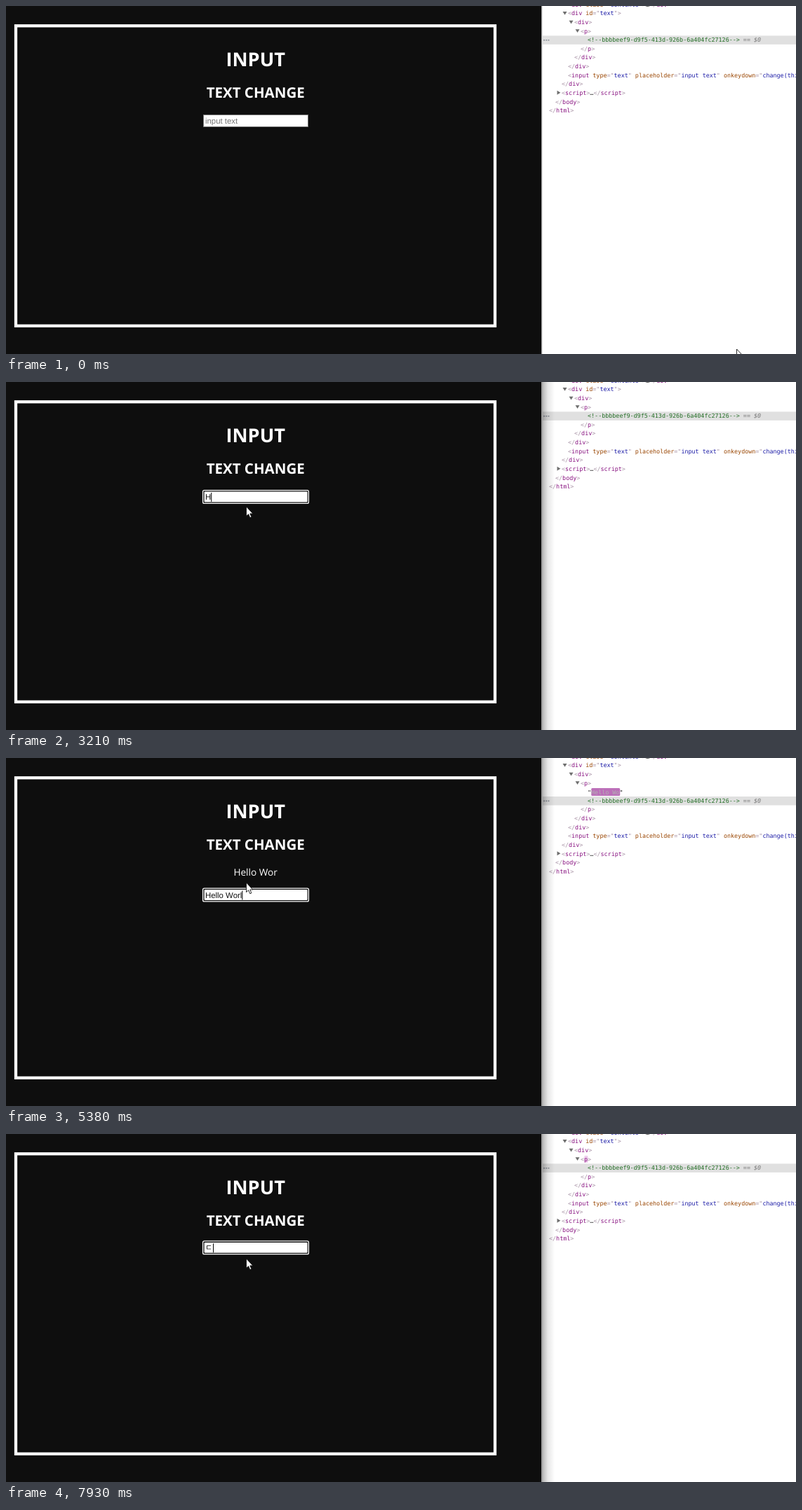
These frames come from a looping animation (1126 by 497 pixels, 8 s). An HTML page:

```html
<!DOCTYPE html>
<html lang="en">
<head>
<meta charset="utf-8">
<title>Input text change</title>
<style>
  html, body { margin: 0; width: 100%; height: 100%; overflow: hidden; background: #0e0e0e; }
  svg { display: block; width: 100%; height: 100%; }
  text { white-space: pre; text-rendering: geometricPrecision; }
  .page { font-family: "Open Sans", "Noto Sans", sans-serif; fill: #fff; text-anchor: middle; }
  .field { font: 11.4px "Liberation Sans", Arial, sans-serif; }
  .code { font: 8.39px "DejaVu Sans Mono", monospace; fill: #a894a6; }
  .tag { fill: #881280; }
  .attr { fill: #994500; }
  .val { fill: #1a1aa6; }
  .dark { fill: #222; }
</style>
</head>
<body>
<svg viewBox="0 0 1126 497" preserveAspectRatio="none">
  <defs>
    <linearGradient id="shade">
      <stop offset="0" stop-color="#000" stop-opacity=".3"/>
      <stop offset=".45" stop-color="#000" stop-opacity=".1"/>
      <stop offset="1" stop-color="#000" stop-opacity="0"/>
    </linearGradient>
  </defs>
  <rect width="1126" height="497" fill="#0e0e0e"/>
  <rect x="14" y="28.3" width="683" height="428.5" fill="none" stroke="#fff" stroke-width="4.3"/>
  <g class="page">
    <text x="355.7" y="86" font-size="27.2" font-weight="700">INPUT</text>
    <text x="355.7" y="131.3" font-size="20.5" font-weight="700">TEXT CHANGE</text>
    <text id="para" x="355.6" y="168" font-size="13.6"></text>
  </g>
  <g id="field">
    <rect id="plain" x="281.5" y="155.5" width="149" height="17" fill="#fff" stroke="#767676"/>
    <g id="focus">
      <rect x="280.6" y="154.6" width="150.8" height="18.8" rx="2" fill="#0e0e0e" stroke="#fff" stroke-width="1.3"/>
      <rect x="282.6" y="156.6" width="147" height="14.8" rx="1" fill="#fff"/>
    </g>
    <text id="hint" class="field" x="284" y="168" fill="#757575">input text</text>
    <text id="value" class="field" x="284" y="168" fill="#111"></text>
    <text id="jamo" x="284" y="168" fill="#111" font-size="11" font-family="'Noto Sans CJK KR', 'Noto Sans CJK', sans-serif">ㄷ</text>
    <rect id="caret" y="158" width="1" height="13" fill="#000"/>
  </g>

  <rect x="763.5" width="362.5" height="497" fill="#fff"/>
  <rect x="763.5" width="1" height="497" fill="#c8c8c8"/>
  <rect id="tagFlash" x="824.4" y="31" width="5" height="10" rx="1"/>
  <g id="upper" class="code"></g>
  <g id="added" class="code">
    <rect id="rowFlash" x="819" y="42.3" width="307" height="12.7"/>
    <rect id="textFlash" x="834.2" y="43" width="0" height="11" rx="1.5"/>
    <text id="node" x="829" y="51.7"><tspan class="dark">"</tspan><tspan id="nodeText"></tspan><tspan class="dark">"</tspan></text>
  </g>
  <g id="lower" class="code">
    <rect x="764" y="42.4" width="362" height="12.5" fill="#e0e0e0"/>
    <path d="M766 48.7h2m1.2 0h2m1.2 0h2" stroke="#8a8f98" stroke-width="1.6"/>
  </g>
  <rect id="shadow" x="764" width="18" height="497" fill="url(#shade)"/>

  <circle id="press" cx="364.5" cy="165" r="10.3" fill="#fbee4a" opacity=".78"/>
  <path id="beam" d="M-3 -6.5H-1Q0 -6.5 0 -5.5Q0 -6.5 1 -6.5H3M0 -5.5V5.5M-3 6.5H-1Q0 6.5 0 5.5Q0 6.5 1 6.5H3" fill="none" stroke="#222" stroke-width="1"/>
  <path id="arrow" d="M0 0V13.6L3.1 10.8L5.3 15.8L7.4 14.8L5.3 10H9.4Z" fill="#fff" stroke="#111" stroke-width=".9"/>
</svg>
<script>
const LOOP = 8000, PITCH = 12.63, LAG = 67, CHAR = 5.05;
const $ = id => document.getElementById(id);
const show = (id, on) => $(id).setAttribute('visibility', on ? 'visible' : 'hidden');
const put = (id, attrs) => { for (const k in attrs) $(id).setAttribute(k, attrs[k]); };
const move = (id, x, y) => put(id, { transform: `translate(${x} ${y})` });
const setText = (id, s) => { if ($(id).textContent !== s) $(id).textContent = s; };

// Element tree
const esc = s => s.replace(/</g, '&lt;');
const span = (cls, s) => `<tspan class="${cls}">${s}</tspan>`;
function paint(src) {
  let prev = '';
  return src.replace(/"([^"]*)("?)|\w+|[^\w"]/g, (m, inner, end) => {
    let out = esc(m);
    if (inner !== undefined) out = '"' + span('val', inner) + end;
    else if (/\w/.test(m)) out = span(prev === '<' || prev === '/' ? 'tag' : 'attr', m);
    else if (m === '…') out = span('dark', m);
    prev = m;
    return out;
  });
}
function line(group, row, x, markup, twisty) {
  const y = 10.3 + row * PITCH;
  let s = `<text x="${x}" y="${y + 3}">${markup}</text>`;
  if (twisty === 'open') s += `<path d="M${x - 7.5} ${y - 2.3}h6l-3 4.8z" fill="#6e6e6e"/>`;
  if (twisty === 'shut') s += `<path d="M${x - 6.5} ${y - 3.3}v6l4.8 -3z" fill="#6e6e6e"/>`;
  $(group).insertAdjacentHTML('beforeend', s);
}
line('upper', -1, 801, paint('<div class="contents">…</div>'));
line('upper', 0, 801, paint('<div id="text">'), 'open');
line('upper', 1, 810, paint('<div>'), 'open');
line('upper', 2, 819, paint('<p>'), 'open');
line('lower', 3, 829, '<tspan fill="#236e25">&lt;!--bbbbeef9-d9f5-413d-926b-6a404fc27126--&gt;</tspan>'
  + '<tspan fill="#777" font-style="italic"> == $0</tspan>');
[[819, '</p>'], [810, '</div>'], [801, '</div>'],
 [801, '<input type="text" placeholder="input text" onkeydown="change(this)">'],
 [792, '</div>'], [792, '<script>…<\/script>', 'shut'], [783, '</body>'], [774, '</html>']
].forEach(([x, src, twisty], i) => line('lower', 4 + i, x, paint(src), twisty));

// Key presses: the paragraph receives the value from before each key
const PHRASE = 'Hello World!';
const keys = [];
const press = (time, value) => keys.push({ time, value, before: keys.length ? keys[keys.length - 1].value : '' });
[3210, 3360, 3700, 3850, 4030, 4556, 4800, 5000, 5180, 5340, 5480, 5632]
  .forEach((time, i) => press(time, PHRASE.slice(0, i + 1)));
press(6310, PHRASE.slice(0, -1));
for (let i = 0; i < 20; i++) press(6810 + 33 * i, PHRASE.slice(0, Math.max(0, 10 - i)));
press(7930, 'ㄷ');
const IDLE = { time: 1910, value: '', before: '' };
const lastKey = t => keys.filter(k => k.time <= t).pop() || IDLE;
const firstRow = keys.find(k => k.before).time + LAG;
const cleared = keys.find(k => k.time > 6310 && !k.before).time + LAG;

// Flash of a changed node: strong purple, pale pink, then the backdrop
const FROM = [158, 54, 153], PALE = [245, 219, 244], WHITE = [255, 255, 255], INK = [34, 34, 34];
function ease(x) {
  let lo = 0, hi = 1;
  for (let i = 0; i < 24; i++) {
    const s = (lo + hi) / 2;
    if (.6 * s * s + .4 * s * s * s < x) lo = s; else hi = s;
  }
  return lo * lo * (3 - 2 * lo);
}
const mix = (a, b, k) => `rgb(${a.map((v, i) => Math.round(v + (b[i] - v) * k))})`;
function flash(id, age) {
  const on = age >= 0 && age < 1400;
  show(id, on);
  if (!on) return;
  put(id, age < 1120
    ? { fill: mix(FROM, PALE, ease(age / 1120)), 'fill-opacity': 1 }
    : { fill: mix(PALE, PALE, 0), 'fill-opacity': 1 - ease((age - 1120) / 280) });
}

function drawPointer(t) {
  const beam = t >= 810 && t < 2140;
  show('beam', beam);
  show('arrow', !beam);
  show('press', t >= 1910 && t < 1990);
  if (beam) {
    const [x, y] = t < 890 ? [376, 164] : t < 1130 ? [369.5, 160] : t < 1210 ? [368, 162] : [366, 165];
    move('beam', x, y);
    put('beam', { stroke: t >= 1910 && t < 1990 ? '#6b6420' : '#222' });
  } else if (t < 810) {
    const step = t < 70 ? 0 : Math.floor((t - 70) / 74) + 1;
    const k = step / 11, e = k * k * (3 - 2 * k);
    move('arrow', 1041.5 - 665 * e, 490 - 326 * e);
  } else {
    move('arrow', t < 2210 ? 348 : 342.5, t < 2210 ? 174 : 178);
  }
}

function drawField(t) {
  const key = lastKey(t), focused = t >= 1910, jamo = key.value === 'ㄷ';
  setText('para', key.before.trim());
  setText('value', jamo ? '' : key.value);
  show('jamo', jamo);
  show('hint', !key.value);
  show('plain', !focused);
  show('focus', focused);
  move('field', 0, key.before ? 31.5 : jamo ? -1.7 : 0);
  const width = jamo ? 11 : key.value ? $('value').getComputedTextLength() : 0;
  put('caret', { x: 284 + width });
  show('caret', focused && (t - key.time) % 1060 < 530);
}

function drawTree(t) {
  const key = lastKey(t - LAG), text = key.before, first = text.length === 1 && t < 5000;
  const age = t - key.time - LAG;
  $('added').style.display = text ? '' : 'none';
  move('lower', 0, text ? PITCH : 0);
  flash('tagFlash', t - cleared);
  show('shadow', t >= 1910);
  if (!text) return;
  flash('rowFlash', t - firstRow);
  flash('textFlash', first ? -1 : age);
  put('textFlash', { width: text.length * CHAR + .6 });
  show('node', !first);
  setText('nodeText', text);
  put('nodeText', { fill: mix(WHITE, INK, ease(Math.min(1, age / 1120))) });
}

function draw(t) {
  // Held backspace is seen in coarse screen updates
  const u = t >= 6740 && t < 7540 ? 6990 + 80 * Math.floor((t - 6990) / 80) : t;
  drawPointer(t);
  drawField(u);
  drawTree(u);
}

const start = performance.now();
function tick() {
  draw((performance.now() - start) % LOOP);
  requestAnimationFrame(tick);
}
tick();
</script>
</body>
</html>
```
